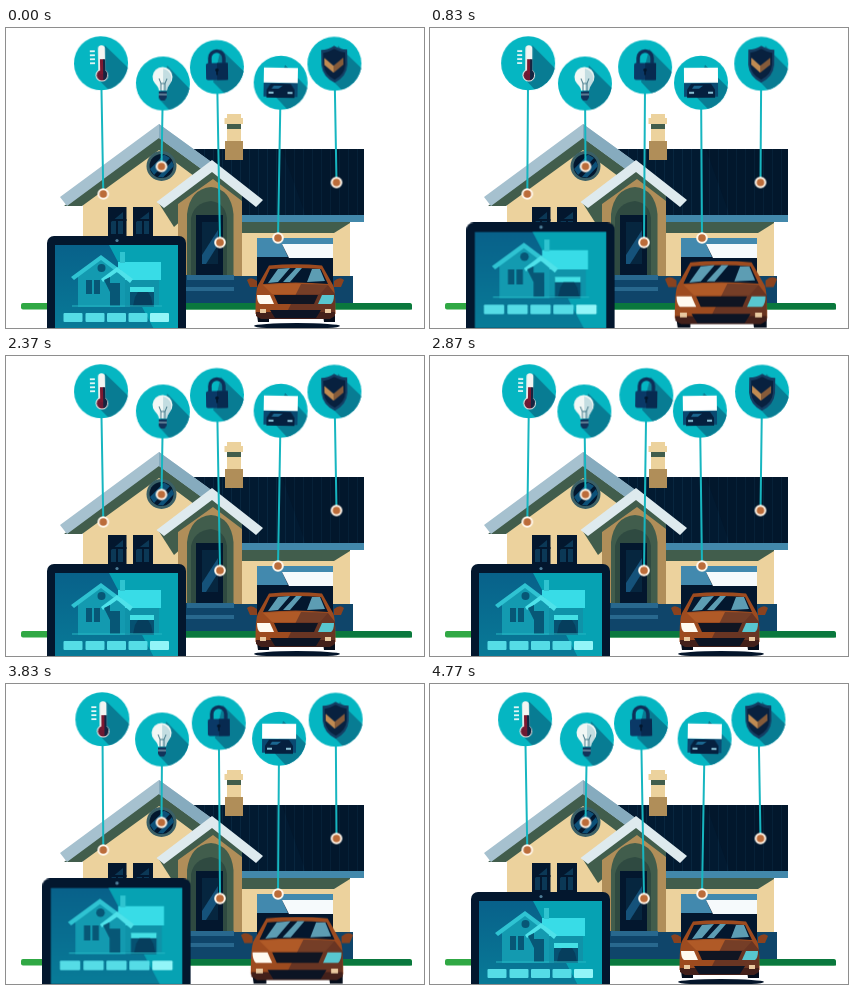
An HTML page for the animation above (4810 ms loop, 418 by 300 pixels).

```html
<!DOCTYPE html>
<html lang="en">
<head>
<meta charset="utf-8">
<title>Smart home</title>
<style>
  html, body { margin: 0; width: 100%; height: 100%; overflow: hidden; background: #fff; }
  svg { display: block; width: 418px; height: 300px; }

  .sway { animation: sway 601.25ms cubic-bezier(.37, 0, .63, 1) infinite alternate; }
  .left { --a: -1deg; }
  .right { --a: 1deg; }
  @keyframes sway {
    from { transform: rotate(var(--a)); }
    to { transform: rotate(calc(var(--a) * -1)); }
  }

  /* two 1.2 s swells per loop, starting at 0 s and 3 s */
  .pulse { animation: pulse 4810ms cubic-bezier(.37, 0, .63, 1) infinite; }
  .tablet { --s: 1.1; transform-origin: 110.5px 408px; }
  .car { --s: 1.23; transform-origin: 280px 258px; }
  @keyframes pulse {
    0%, 24.95%, 62.37%, 87.32%, 100% { transform: scale(1); }
    12.47%, 74.84% { transform: scale(var(--s)); }
  }

  .navy { fill: #03172e; }
  .beige { fill: #ecd29d; }
  .tan { fill: #b08e59; }
  .green { fill: #415d4c; }
  .slate { fill: #a6c1cf; }
  .blue { fill: #0f456a; }
</style>
</head>
<body>
<svg viewBox="0 0 418 300">
  <defs>
    <pattern id="tiles" width="9" height="10" patternUnits="userSpaceOnUse">
      <rect width="9" height="10" fill="#021a31"/>
      <rect width="1" height="10" fill="#08263f"/>
    </pattern>
    <linearGradient id="screen" x2="0" y2="1">
      <stop offset="0" stop-color="#08618a"/>
      <stop offset="1" stop-color="#087c98"/>
    </linearGradient>
    <clipPath id="disc"><circle r="27"/></clipPath>
    <g id="badge">
      <circle r="27" fill="#05b6c2"/>
      <path d="M4-18 38 16 34 34 14 34-4 15Z" fill="#087c93" clip-path="url(#disc)"/>
    </g>
    <g id="pin">
      <circle r="5.8" fill="#fff6ea"/>
      <circle r="3.8" fill="#bb6c3a"/>
    </g>
  </defs>

  <!-- ground -->
  <rect x="15" y="275" width="391" height="6.500" rx="2" fill="#30a844"/>
  <path d="M180 275H404L406 277V281.500H180Z" fill="#0a783e"/>

  <!-- garage wing -->
  <path class="beige" d="M233 190H344V275H233Z"/>
  <path class="green" d="M233 192H344V195L328 205H233Z"/>
  <path class="blue" d="M327 248H347V275H327ZM228 248H252V275H228Z"/>
  <path class="navy" d="M251 210H327V275H251Z"/>
  <path d="M251 210H327V216H276L282 229H251Z" fill="#4289ae"/>
  <path d="M276 216H327V230H283Z" fill="#f6fafc"/>
  <path d="M188 121H358V188H188Z" fill="url(#tiles)"/>
  <path d="M276 121H358V188H300Z" fill="#010d1d" opacity=".2"/>
  <path d="M230 187H358V194H230Z" fill="#4288ab"/>

  <!-- chimney -->
  <path class="beige" d="M221 86H235V113H221Z"/>
  <path class="green" d="M221 96H235V101H221Z"/>
  <path class="beige" d="M218.500 90H237V96H218.500Z"/>
  <path class="tan" d="M219 113H237V132H219Z"/>

  <!-- main gable -->
  <path class="beige" d="M153 104 77 161V275H188V170L205 145Z"/>
  <path class="green" d="M153 106 58 178H76L153 122 192 151 205 148Z"/>
  <path class="slate" d="M153 96 54 169 61 178 153 110 205 148 215 141Z"/>
  <path d="M153 96 215 141 205 148 153 110Z" fill="#86abbe"/>
  <circle cx="155.500" cy="138" r="15" fill="#3a5f66"/>
  <circle class="navy" cx="155.500" cy="138" r="12"/>
  <path d="M158 126.500 164 130 148 147 144 141ZM166 133 168 138 157 149.500 152 149Z" fill="#0d5078"/>

  <!-- front windows -->
  <path class="navy" d="M102 179H120.500V216H102ZM127 179H147V216H127Z"/>
  <path d="M105 194 117 184V206H105ZM130 194 143 184V206H130Z" fill="#0b3856"/>
  <path d="M102 192H120.500M127 192H147M111 192V216M137 192V216" stroke="#03172e" stroke-width="2"/>

  <!-- porch -->
  <path class="green" d="M152 174 168 199 178 190V172L164 165Z"/>
  <path class="tan" d="M207 139 172 166V248H236V166Z"/>
  <path class="green" d="M207 141 172 167V176L207 151 236 173V165Z"/>
  <path class="green" d="M181 248V186Q184 161 205 159Q225 161 227.500 186V248Z"/>
  <path d="M185 248V190Q188 175 205 173Q219 175 221 190V248Z" fill="#2f4a41"/>
  <path class="navy" d="M190 187H217V248H190Z"/>
  <path d="M196 194H212V236H196Z" fill="#06263f"/>
  <path d="M212 202V217L200 236H196V227Z" fill="#15527a"/>
  <path d="M206 132 150.500 174 158 180 206 144 250 179 257 172Z" fill="#deeaee"/>
  <path class="blue" d="M179 247H228V275H179Z"/>
  <path d="M181 247H228V252H181ZM179 259H228V263H179Z" fill="#28688e"/>

  <!-- car -->
  <g class="car pulse">
    <ellipse cx="291" cy="298" rx="43" ry="3" fill="#04152a"/>
    <path d="M250 280H263V294H252ZM316 280H329V294H318Z" fill="#050d1b"/>
    <path d="M263 237.500Q290 235 316 237.500L327 257Q329.500 262 329.500 286H249.500Q249.500 262 252 257Z" fill="#9d4b1f"/>
    <path d="M241 252Q245 248 251 253V259H244ZM338 252Q334 248 328 253V259H335Z" fill="#8a421e"/>
    <path class="navy" d="M264 241Q290 239 315 241L322 256Q290 253 257 256Z"/>
    <path d="M272 241 284 240 272 254 262 255ZM290 240H296L284 254H277ZM306 241H314L319 253 301 254Z" fill="#5d9db3"/>
    <path d="M257 257Q290 254 322 257L314 266H266Z" fill="#b05a27"/>
    <path d="M295 256Q310 256 322 257L329 266V286H280Z" fill="#1d1628" opacity=".4"/>
    <path d="M268 267H312L308 276H272Z" fill="#101522"/>
    <path d="M251 267H264L268 276H254Q251 274 251 267Z" fill="#fffaf0"/>
    <path d="M328 267H316L312 276H325Q328 274 328 267Z" fill="#58c6cf"/>
    <path d="M250 284H329V288L324 291H255L250 288Z" fill="#43201a"/>
    <path d="M264 282H315L310 290H269Z" fill="#0c1424"/>
    <path d="M254 281H260V285H254ZM319 281H325V285H319Z" fill="#e9c9a0"/>
  </g>

  <!-- tablet -->
  <g class="tablet pulse">
    <rect class="navy" x="41" y="208" width="139" height="130" rx="7"/>
    <circle cx="111" cy="212.500" r="1.600" fill="#4f7f99"/>
    <rect x="49" y="217" width="123" height="90" fill="url(#screen)"/>
    <path d="M103 217H172V307H151Z" fill="#06a2b3"/>
    <path d="M112 234H155V252H112Z" fill="#38dce7"/>
    <path d="M116 252H153V277H116Z" fill="#0f93a9"/>
    <path d="M124 260H148V279H124Z" fill="#065272"/>
    <path d="M124 259H148V264H124Z" fill="#45e0e5"/>
    <path d="M114 224H119V235H114Z" fill="#2fc4d0"/>
    <path d="M95 230 72 248V279H119V248Z" fill="#139ab0"/>
    <path d="M95 227 65 249 68 252 95 232 112 245 115 242Z" fill="#2fc3d2"/>
    <path d="M111 239 95 251 97 254 111 244 124 255 127 251Z" fill="#4fe2ea"/>
    <path d="M80 252H86V266H80ZM88 252H94V266H88ZM104 255H114V278H104ZM98 252 104 249V264Z" fill="#075776"/>
    <circle cx="95.500" cy="240" r="4" fill="#075776"/>
    <path d="M129 269 132 264H142L145 269 147 278H127Z" fill="#063e5d"/>
    <path d="M66 278H156" stroke="#25b6c3"/>
    <g fill="#55dce6">
      <rect x="57.500" y="285" width="19" height="9" rx="1"/>
      <rect x="79.500" y="285" width="19" height="9" rx="1"/>
      <rect x="101" y="285" width="19" height="9" rx="1"/>
      <rect x="122.500" y="285" width="19" height="9" rx="1"/>
      <rect x="144" y="285" width="19" height="9" rx="1" fill="#92f5f8"/>
    </g>
  </g>

  <!-- badges, each hinged on its pin -->
  <g stroke-linejoin="round">
    <g transform="translate(97.300 166)"><g class="sway left">
      <path d="M0-108V0" stroke="#16b6c0" stroke-width="2"/>
      <g transform="translate(0 -130.800)">
        <use href="#badge"/>
        <path d="M-11-12H-6M-11-8H-6M-11-4H-6M-11 0H-6" stroke="#e9f8f8" stroke-width="1.800"/>
        <rect x="-2.800" y="-18" width="7" height="30" rx="3.500" fill="#f4f5f2"/>
        <circle cx=".7" cy="12" r="6.300" fill="#e6e8e6"/>
        <circle cx=".7" cy="12" r="5.200" fill="#6d1a33"/>
        <path d="M.7-4V11" stroke="#7d1930" stroke-width="3.500"/>
        <path d="M2-4H4.200V7Q7 10 5.900 12A5.200 5.200 0 0 1 2 17Z" fill="#142440"/>
      </g>
      <use href="#pin"/>
    </g></g>

    <g transform="translate(155.500 138.500)"><g class="sway right">
      <path d="M0-60V0" stroke="#16b6c0" stroke-width="2"/>
      <g transform="translate(0 -83)">
        <use href="#badge"/>
        <path d="M-4 7Q-4 4-8 0A10 10 0 1 1 7 0Q4 4 4 7Z" fill="#f1f7f5"/>
        <path d="M0-15A10 10 0 0 1 7 0Q4 4 4 7H0Z" fill="#c3dde1"/>
        <path d="M-4-5-2 0V7M4-5 2 0V7M-2 0H2" fill="none" stroke="#417687"/>
        <path d="M-4 8H4V14L2 17H-2L-4 14Z" fill="#12335a"/>
        <path d="M-4 11H4" stroke="#a9c4cc"/>
      </g>
      <use href="#pin"/>
    </g></g>

    <g transform="translate(214 214.500)"><g class="sway left">
      <path d="M0-150V0" stroke="#16b6c0" stroke-width="2"/>
      <g transform="translate(0 -175.500)">
        <use href="#badge"/>
        <path d="M-7-2V-9A7 7 0 0 1 7-9V-2" fill="none" stroke="#0d2f58" stroke-width="3.500"/>
        <rect x="-11" y="-4" width="22" height="17" rx="2" fill="#0a3967"/>
        <path d="M0-4H11V13H0Z" fill="#072a50"/>
        <circle cy="3" r="1.800" fill="#03172e"/>
        <path d="M0 3V8" stroke="#03172e" stroke-width="1.600"/>
      </g>
      <use href="#pin"/>
    </g></g>

    <g transform="translate(272 210)"><g class="sway right">
      <path d="M0-132V0" stroke="#16b6c0" stroke-width="2"/>
      <g transform="translate(0 -155.300)">
        <use href="#badge"/>
        <path d="M-17 0H17V14H-17Z" fill="#0a4a72"/>
        <path d="M-17-15H17V0H-17Z" fill="#fff"/>
        <path d="M-14 7-10 1H10L14 7V15H-14Z" fill="#05203f"/>
        <path d="M-9 6-7 3H2L-2 6Z" fill="#1b6791"/>
        <path d="M-12 9H-7V11H-12ZM7 9H12V11H7Z" fill="#8cc4d8"/>
      </g>
      <use href="#pin"/>
    </g></g>

    <g transform="translate(330.500 154.500)"><g class="sway left">
      <path d="M0-93V0" stroke="#16b6c0" stroke-width="2"/>
      <g transform="translate(0 -118.800)">
        <use href="#badge"/>
        <path d="M0-18Q6-14 13-14V1Q12 13 0 19Q-12 13-13 1V-14Q-6-14 0-18Z" fill="#143d62"/>
        <path d="M0-15Q5-12 11-11V1Q10 11 0 16Q-10 11-11 1V-11Q-5-12 0-15Z" fill="#08213f"/>
        <path d="M-10-6-1 2V9L-10 1Z" fill="#c08b52"/>
        <path d="M9-6-1 2V9L9 1Z" fill="#855b3a"/>
      </g>
      <use href="#pin"/>
    </g></g>
  </g>
</svg>
</body>
</html>
```
